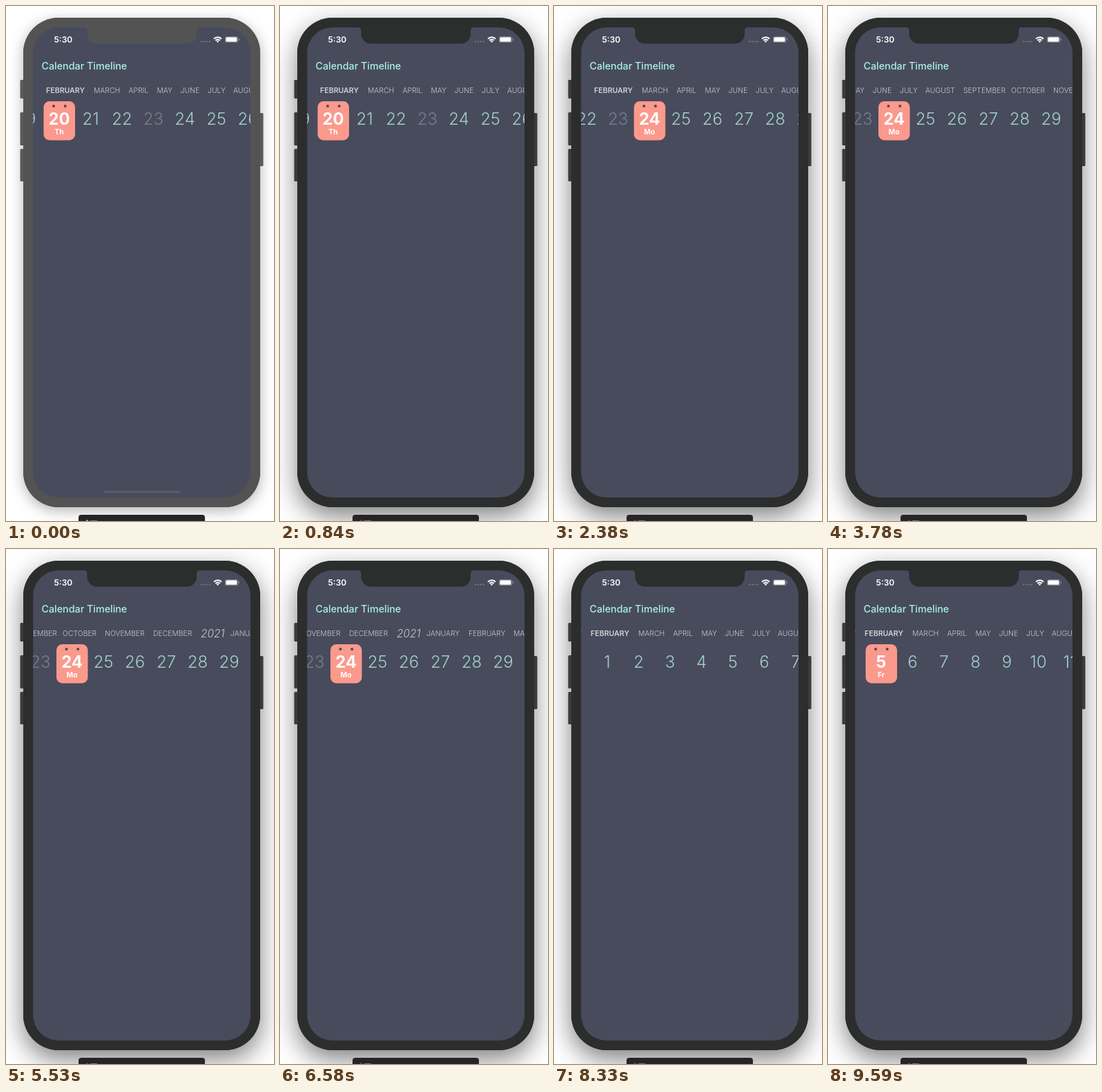
Write an HTML page with a canvas that moves like this. It is 388 by 746 pixels and loops after 9.87 s.

```html
<!DOCTYPE html>
<html lang="en">
<head>
<meta charset="utf-8">
<title>Calendar Timeline</title>
<style>
  html, body { margin: 0; width: 100%; height: 100%; overflow: hidden; background: #fff; }
  canvas { display: block; width: 388px; height: 746px; }
</style>
</head>
<body>
<canvas id="stage"></canvas>
<script>
const W = 388, H = 746, LOOP = 9870, STEP = 70, LAST = 9590;
const SCREEN = '#484b5b', TEAL = '#a0cfd1', CARD = '#fb998d';
const PITCH = 45.5, DAY_X = 77;
const FOCUS = 420, TAP_24 = 1990, TAP_MONTH = 7300, TAP_5 = 8850;

const canvas = document.getElementById('stage');
const ctx = canvas.getContext('2d');
const dpr = window.devicePixelRatio || 1;
canvas.width = W * dpr;
canvas.height = H * dpr;
ctx.scale(dpr, dpr);

const clamp = (v, a, b) => Math.min(b, Math.max(a, v));
const progress = (t, start, length) => clamp((t - start) / length, 0, 1);
const easeOut = p => 1 - (1 - p) ** 3;

// cubic-bezier(.42, 0, 1, 1)
function easeIn(x) {
  let lo = 0, hi = 1;
  for (let i = 0; i < 24; i++) {
    const s = (lo + hi) / 2, q = 1 - s;
    if (1.26 * q * q * s + 3 * q * s * s + s ** 3 < x) lo = s; else hi = s;
  }
  return 3 * lo * lo - 2 * lo ** 3;
}

function box(x, y, w, h, r, fill) {
  ctx.beginPath();
  ctx.roundRect(x, y, w, h, r);
  ctx.fillStyle = fill;
  ctx.fill();
}

function dot(x, y, r, fill) {
  ctx.beginPath();
  ctx.arc(x, y, r, 0, Math.PI * 2);
  ctx.fillStyle = fill;
  ctx.fill();
}

function label(str, x, y, font, fill, align = 'left') {
  ctx.font = font + ' Inter, sans-serif';
  ctx.textAlign = align;
  ctx.fillStyle = fill;
  ctx.fillText(str, x, y);
}

function phone(active) {
  const body = active ? '#2c2d2d' : '#535353';
  const button = active ? '#3b3b3d' : '#5a5a5a';
  ctx.fillStyle = '#fff';
  ctx.fillRect(0, 0, W, H);

  ctx.save();
  ctx.shadowColor = active ? 'rgba(0,0,0,.5)' : 'rgba(0,0,0,.3)';
  ctx.shadowBlur = (active ? 36 : 20) * dpr;
  ctx.shadowOffsetY = (active ? 13 : 5) * dpr;
  box(25, 17, 343, 709, 51, body);
  ctx.restore();

  for (const [x, y, h] of [[20.5, 107, 27], [20.5, 154, 48], [20.5, 207, 47], [366, 155, 77]])
    box(x, y, 6.5, h, 1.5, button);
  box(25, 17, 343, 709, 51, body);
  box(39.2, 31, 314.8, 681, 37, SCREEN);

  // notch
  ctx.beginPath();
  ctx.moveTo(112, 30.5);
  ctx.quadraticCurveTo(117.5, 31, 117.5, 36);
  ctx.lineTo(117.5, 40);
  ctx.arcTo(117.5, 54.5, 132, 54.5, 14);
  ctx.lineTo(262, 54.5);
  ctx.arcTo(276, 54.5, 276, 40, 14);
  ctx.lineTo(276, 36);
  ctx.quadraticCurveTo(276, 31, 281, 30.5);
  ctx.closePath();
  ctx.fillStyle = body;
  ctx.fill();

  if (!active) box(141, 702, 111, 3.6, 1.8, '#575a68');

  box(105, 737, 183, 14, 4, '#252428');
  box(116, 744.5, 3, 2, 0, active ? '#8e3e42' : '#aaa');
  box(122, 745, 10, 1, 0, '#77777b');
}

function statusBar() {
  label('5:30', 69.5, 53, '600 12px', '#fff');
  for (let i = 0; i < 4; i++) dot(283.3 + i * 3.8, 51.5, 1.1, '#7d808d');

  ctx.lineWidth = 2;
  ctx.strokeStyle = '#fff';
  for (const r of [4.4, 7.7]) {
    ctx.beginPath();
    ctx.arc(306.5, 53, r, -Math.PI * .755, -Math.PI * .245);
    ctx.stroke();
  }
  ctx.beginPath();
  ctx.moveTo(306.5, 53);
  ctx.arc(306.5, 53, 2.6, -Math.PI * .75, -Math.PI * .25);
  ctx.fillStyle = '#fff';
  ctx.fill();

  box(317, 44, 19.2, 9, 2.6, '#858895');
  box(317.7, 44.7, 17.8, 7.6, 2, SCREEN);
  box(318.3, 45.3, 16.2, 6.4, 1.5, '#fff');
  box(336.7, 46.8, 1.3, 3.4, .7, '#858895');
}

const YEAR = [['FEBRUARY', 58], ['MARCH', 127], ['APRIL', 177.5], ['MAY', 218.5],
  ['JUNE', 252.5], ['JULY', 292], ['AUGUST', 329], ['SEPTEMBER', 384]];
const TURN = [['OCTOBER', 453], ['NOVEMBER', 514], ['DECEMBER', 584], ['JANUARY', 696]];

function monthShift(t) {
  return 190 * easeOut(progress(t, 3000, 1000))
    + 181 * easeOut(progress(t, 4300, 1100))
    + 113 * easeOut(progress(t, 5750, 800))
    + 220 * easeIn(progress(t, TAP_MONTH, 500));
}

function months(t) {
  const shift = monthShift(t), next = t >= TAP_MONTH;
  const item = (name, x, bold) => label(name, x - shift, 126,
    bold ? '600 10.6px' : '300 10.4px', bold ? '#d0d1d6' : '#c9cad0');
  YEAR.forEach(([name, x], i) => {
    item(name, x, !i && !next);
    item(name, x + 699 - (i && !next ? 4 : 0), !i && next);
  });
  TURN.forEach(([name, x]) => item(name, x));
  label('2021', 653 - shift, 128, 'italic 300 15.4px', '#c9cad0');
}

function dayState(t) {
  if (t < TAP_24) return { count: 29, shift: 19 * PITCH, pick: 20, name: 'Th' };
  if (t < TAP_MONTH) {
    const move = 4 * PITCH * easeIn(progress(t, TAP_24, 500));
    return { count: 29, shift: 19 * PITCH + Math.min(163.5, move), pick: 24, name: 'Mo' };
  }
  if (t < TAP_5)
    return { count: 28, shift: 982.5 * (1 - easeIn(progress(t, TAP_MONTH, 500))) };
  return { count: 28, shift: 4 * PITCH * easeIn(progress(t, TAP_5, 500)), pick: 5, name: 'Fr' };
}

function days(t) {
  const { count, shift, pick, name } = dayState(t);
  for (let d = 1; d <= count; d++) {
    const x = DAY_X + (d - 1) * PITCH - shift;
    if (x < 0 || x > W) continue;
    if (d === pick) {
      box(x - 22.5, 138, 45.5, 56.5, 8.5, CARD);
      dot(x - 8, 145, 2, SCREEN);
      dot(x + 8.7, 145, 2, SCREEN);
      label(d, x, 171.5, '700 23.8px', '#fff', 'center');
      label(name, x, 185.7, '700 10.3px', '#fff', 'center');
    } else {
      label(d, x, 171.5, '300 24px', d === 23 ? '#747e8c' : TEAL, 'center');
    }
  }
}

function draw(t) {
  phone(t >= FOCUS);
  statusBar();
  label('Calendar Timeline', 51.5, 91.5, '500 14.3px', '#a9f0e8');
  ctx.save();
  ctx.beginPath();
  ctx.rect(39.2, 100, 314.8, 110);
  ctx.clip();
  months(t);
  days(t);
  ctx.restore();
}

function tick() {
  const t = performance.now() % LOOP;
  draw(Math.min(LAST, Math.floor(t / STEP) * STEP));
  requestAnimationFrame(tick);
}
tick();
</script>
</body>
</html>
```
